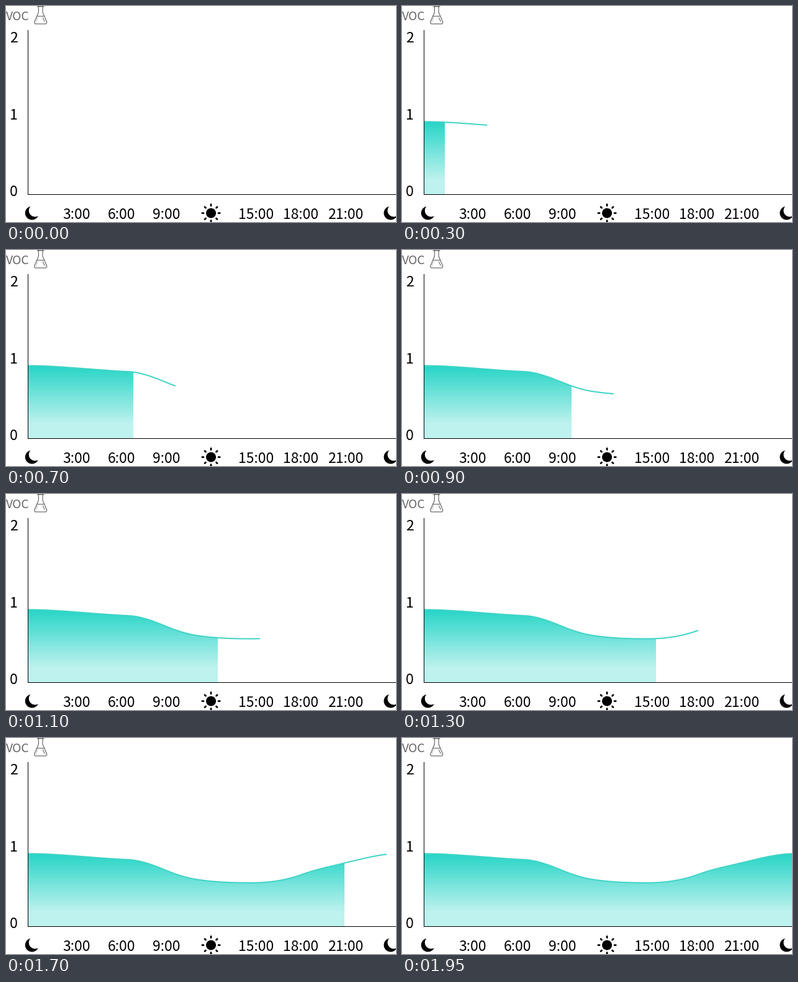
Write a matplotlib script that moves like this. It is 628x350 px and loops after 2400 ms.

```python
import numpy as np
import matplotlib.pyplot as plt
from matplotlib.animation import FuncAnimation
from matplotlib.colors import LinearSegmentedColormap
from matplotlib.patches import Circle, Polygon

W, H, DPI = 628, 350, 100
PX = 72 / DPI                # one pixel in points
FRAMES, STEP_MS = 48, 50
X0, BASE, TOP = 35, 305.5, 187
END = 630
SPEED, LAG = 17, 4           # pixels per frame; frames the fill trails the line
GRAY = "#5a5a5a"

# x, y and slope where the curve turns
KEYS = np.array([(35, 187.4, 0), (195, 196.9, 0.04), (256, 213.7, 0.42),
                 (306, 229, 0.16), (395, 234.6, 0), (477, 221, -0.37),
                 (545, 202.7, -0.24), (632, 187.4, 0)])


def curve(x):
    """Cubic Hermite curve through the keys."""
    kx, ky, slope = KEYS.T
    i = np.clip(np.searchsorted(kx, x, side="right") - 1, 0, len(kx) - 2)
    h = kx[i + 1] - kx[i]
    t = (x - kx[i]) / h
    ease = t * t * (3 - 2 * t)
    return (ky[i] + (ky[i + 1] - ky[i]) * ease
            + h * t * (1 - t) * ((1 - t) * slope[i] - t * slope[i + 1]))


def hour_x(hour):
    return 41.8 + 72.2 * hour / 3


fig = plt.figure(figsize=(W / DPI, H / DPI), dpi=DPI, facecolor="white")
ax = fig.add_axes([0, 0, 1, 1])
ax.axis("off")


def stroke(points, color="black", width=1.0, **kw):
    x, y = zip(*points)
    return ax.plot(x, y, color=color, lw=width * PX, snap=False, **kw)[0]


def label(x, baseline, text, size, color="black", ha="center"):
    ax.text(x, baseline, text, fontsize=size * PX, color=color, ha=ha,
            va="baseline", family="Noto Sans CJK JP")


def arc(cx, cy, r, start, end):
    a = np.linspace(start, end, 50)
    return np.column_stack([cx + r * np.cos(a), cy + r * np.sin(a)])


def moon(cx, cy, r=11, cut=10, dx=5, dy=-4):
    """Disc with a second disc cut out of its upper right."""
    d, phi = np.hypot(dx, dy), np.arctan2(dy, dx)
    a = (r * r - cut * cut + d * d) / (2 * d)
    p, q = np.arccos(a / r), np.arccos((a - d) / cut)
    full = 2 * np.pi
    pts = np.vstack([arc(cx, cy, r, phi + p, phi + full - p),
                     arc(cx + dx, cy + dy, cut, phi + full - q, phi + q)])
    ax.add_patch(Polygon(pts, fc="black", lw=0))


def sun(cx, cy):
    ax.add_patch(Circle((cx, cy), 8, fc="black", lw=0))
    for a in np.arange(8) * np.pi / 4:
        stroke([(cx + r * np.cos(a), cy + r * np.sin(a)) for r in (12, 14.2)],
               width=2.8, solid_capstyle="round")


def flask(cx):
    half = [(3.3, 1), (3.3, 10), (10.2, 26.5), (8.8, 29)]
    outline = [(cx - x, y) for x, y in half] + [(cx + x, y) for x, y in half[::-1]]
    stroke(outline, GRAY, 1.1, solid_joinstyle="round")
    stroke([(cx - 5, 0.8), (cx + 5, 0.8)], GRAY, 1.3)
    stroke([(cx - 6, 16.5), (cx + 6, 16.5)], GRAY)
    stroke([(cx + 3.7, 19), (cx + 6.5, 25)], GRAY)
    stroke([(cx - 5, 19), (cx - 7.5, 25)], GRAY, ls=":")


# gradient, revealed through a growing clip shape
teal = LinearSegmentedColormap.from_list(
    "teal", [(0, "#27d5c7"), (0.79, "#bdf2ee"), (1, "#bdf2ee")])
fill = ax.imshow(np.linspace(0, 1, 236)[:, None], cmap=teal, aspect="auto",
                 extent=(X0, W, 306, TOP), interpolation="bilinear", zorder=1)
line = stroke([(X0, TOP)], "#40d4c5", 2, solid_capstyle="butt", zorder=2)

stroke([(35.5, 39), (35.5, 306)], zorder=3, solid_capstyle="butt")
stroke([(X0, BASE), (W, BASE)], zorder=3, solid_capstyle="butt")

label(0.3, 23, "VOC", 19.3, "#666666", "left")
flask(55.7)
for value in range(3):
    label(12.6, 308 - 124.4 * value, str(value), 23.3)
for hour in (3, 6, 9, 15, 18, 21):
    label(hour_x(hour), 345.3, f"{hour}:00", 23)
moon(hour_x(0), 335.5)
moon(hour_x(24), 335.5)
sun(hour_x(12) - 0.5, 335.6)

ax.set_xlim(0, W)
ax.set_ylim(H, 0)


def trace(i):
    """Points of the curve from the axis to where it has grown by step i."""
    x = np.linspace(X0, np.clip(X0 + SPEED * i, X0, END), 300)
    return x, curve(x)


def draw(i):
    line.set_data(*trace(i))
    line.set_visible(i > 0)

    x, y = trace(i - LAG)
    area = np.vstack([np.column_stack([x, y]), [(x[-1], BASE), (X0, BASE)]])
    fill.set_clip_path(Polygon(area, transform=ax.transData))
    fill.set_visible(i > LAG)
    return line, fill


anim = FuncAnimation(fig, draw, frames=FRAMES, interval=STEP_MS,
                     repeat=True, repeat_delay=0, blit=False)
plt.show()
```
